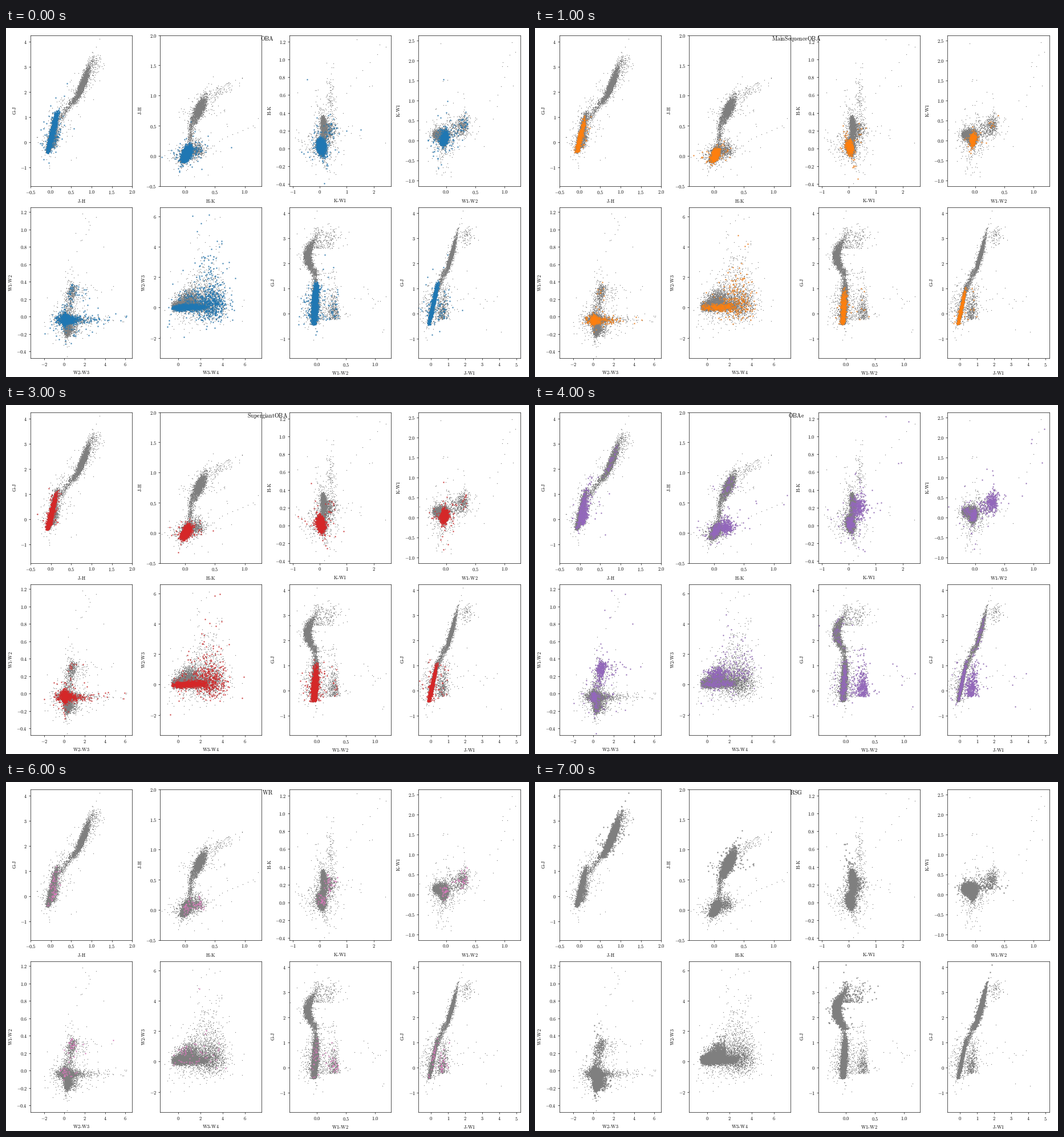
These frames come from a looping animation (917 px wide and 611 px high, 8 s). A matplotlib script:

```python
import math

import numpy as np
import matplotlib.pyplot as plt
from matplotlib.animation import FuncAnimation

W, H, DPI = 917, 611, 64
PX = 72 / DPI  # points per pixel

plt.rcParams.update({
    "mathtext.fontset": "cm",
    "axes.linewidth": 0.67 * PX,
    "axes.labelsize": 8.33 * PX,
})
for side in ("xtick", "ytick"):
    plt.rcParams.update({
        f"{side}.labelsize": 8.33 * PX,
        f"{side}.major.size": 2.9 * PX,
        f"{side}.major.pad": 2.9 * PX,
        f"{side}.major.width": 0.67 * PX,
    })

rng = np.random.default_rng(12)


# --- synthetic stars: one row each, columns as in COLORS

COLORS = ["G-J", "J-H", "H-K", "K-W1", "W1-W2", "W2-W3", "W3-W4"]


def noise(n, sigma):
    """Gaussian scatter with a few strong outliers."""
    return rng.normal(0, np.where(rng.random(n) < 0.04, 4 * sigma, sigma))


def tail(n, share, scale):
    return np.where(rng.random(n) < share, rng.exponential(scale, n), 0)


def hot(n, top=1.35, skew=2.2, faint=0.4):
    """Blue sequence; the faint share forms the cloud at large W3-W4."""
    gj = -0.45 + (top + 0.45) * rng.beta(1.8, skew, n)
    dj, dh = noise(n, 0.025), noise(n, 0.033)
    jh = -0.075 + 0.14 * (gj + 0.4) + dj
    hk = 0.012 + 0.35 * jh + dh
    kw1 = 0.01 + 0.12 * gj - 0.8 * (dj + dh) + noise(n, 0.035)
    w12 = -0.04 + 0.025 * gj + noise(n, 0.025)
    cloud = rng.random(n) < faint
    w34 = np.where(cloud, rng.normal(2.8, 0.75, n),
                   -0.7 + 3.4 * rng.beta(2, 2.3, n))
    w23 = np.where(cloud,
                   rng.normal(0.15, 0.45, n) + tail(n, 0.35, 1.1),
                   0.03 * w34 + noise(n, 0.1))
    return np.column_stack([gj, jh, hk, kw1, w12, w23, w34])


def disk(n):
    """Emission stars, redder than the blue sequence."""
    gj = -0.25 + rng.gamma(1.7, 0.32, n)
    jh = 0.07 + 0.13 * gj + noise(n, 0.045)
    w12 = 0.3 - tail(n, 0.4, 0.09) + noise(n, 0.045)
    hk = 0.09 + 0.4 * w12 + noise(n, 0.06)
    kw1 = 0.2 + 0.6 * w12 + noise(n, 0.12)
    far = rng.random(n) < 0.35
    w34 = np.where(far, rng.normal(2.3, 0.9, n), rng.normal(0.8, 0.45, n))
    w23 = 0.4 + w12 + noise(n, 0.2) + np.where(far, tail(n, 0.6, 0.7), 0)
    return np.column_stack([gj, jh, hk, kw1, w12, w23, w34])


def cool(n):
    """Red supergiant sequence."""
    gj = np.clip(rng.normal(2.28, 0.36, n), 1.55, 3.4) + tail(n, 0.04, 0.35)
    dj, dh = noise(n, 0.04), noise(n, 0.04)
    bow = np.minimum((gj - 2.3) ** 2, 0.6)
    jh = 0.78 + 0.25 * (gj - 2.3) - 0.06 * bow + dj
    hk = 0.24 + 0.4 * (jh - 0.78) + dh
    kw1 = 0.15 + 0.06 * (gj - 2.3) - 0.6 * (dj + dh) + noise(n, 0.03)
    w12 = -0.16 + 0.25 * bow + noise(n, 0.032)
    w12 += np.where(gj > 2.6, tail(n, 0.35, 0.15), 0)
    w34 = -0.7 + 3.8 * rng.beta(2.2, 3.2, n)
    fan = np.clip((w34 + 0.5) / 1.8, 0, 1) * (w34 < 1.6)
    w23 = 0.18 + noise(n, 0.085) + fan * rng.exponential(0.3, n)
    return np.column_stack([gj, jh, hk, kw1, w12, w23, w34])


def yellow(n):
    """Bridge between the blue and the red sequence."""
    gj = rng.uniform(0.85, 1.8, n)
    jh = 0.16 + 0.47 * (gj - 0.85) + noise(n, 0.055)
    hk = 0.05 + 0.1 * jh + noise(n, 0.025)
    kw1 = 0.09 + noise(n, 0.05)
    w12 = -0.03 + noise(n, 0.025)
    w34 = rng.normal(1.5, 0.9, n)
    w23 = 0.1 + noise(n, 0.2) + tail(n, 0.3, 0.6)
    return np.column_stack([gj, jh, hk, kw1, w12, w23, w34])


def carbon(n):
    hk = rng.normal(0.58, 0.13, n)
    gj = 3.1 + noise(n, 0.2)
    jh = 0.76 + 0.55 * hk + noise(n, 0.05)
    kw1 = 0.42 + noise(n, 0.08)
    w12 = 0.18 + noise(n, 0.11)
    w23 = 0.6 + noise(n, 0.2)
    w34 = rng.normal(0.9, 0.6, n)
    return np.column_stack([gj, jh, hk, kw1, w12, w23, w34])


def dusty(n):
    """A few stars strung out along the reddening trail."""
    t = np.linspace(0, 1, n)
    gj = 0.6 + 0.2 * np.sin(9 * t) - 1.4 * t ** 9
    w23 = 1.2 + 1.3 * np.sin(2.4 * t)
    return np.column_stack([gj, 0.28 + 0.22 * t, 0.62 + 0.52 * t,
                            1 + 1.45 * t ** 1.3, 0.75 + 0.38 * t ** 0.6,
                            w23, 1.3 + 0.8 * t])


def stray(n, base=hot, spread=1.0):
    stars = base(n)
    return stars + spread * noise(stars.size, 0.2).reshape(stars.shape) * [
        1.3, 0.4, 0.5, 1.8, 0.5, 4, 3]


groups = [
    ("OBA", [hot(1400, faint=0.42), disk(45), stray(40)]),
    ("MainSequenceOBA", [hot(500, 1.1, 2.6, 0.45), disk(10)]),
    ("EvolvedOBA", [hot(900, 1.2, 2.4, 0.1), disk(18), stray(14)]),
    ("SupergiantOBA", [hot(1200, 1.2, 2.7, 0.32), disk(14), stray(18)]),
    ("OBAe", [hot(220, faint=0.1), disk(330), cool(50), stray(20),
              stray(6, dusty, 1.2)]),
    ("OB[e]", [disk(9), dusty(7)]),
    ("WR", [hot(25), disk(30)]),
    ("RSG", [cool(2300)]),
]
groups = [(name, np.vstack(parts)) for name, parts in groups]
everything = np.vstack([stars for _, stars in groups]
                       + [yellow(360), carbon(90), stray(120)])


# --- panels: x, y, x limits, x step, y limits, y step

PANELS = [
    ("J-H", "G-J", (-0.5, 2.0), 0.5, (-1.75, 4.25), 1),
    ("H-K", "J-H", (-0.42, 1.28), 0.5, (-0.5, 2.0), 0.5),
    ("K-W1", "H-K", (-1.13, 2.64), 1, (-0.42, 1.27), 0.2),
    ("W1-W2", "K-W1", (-0.47, 1.27), 0.5, (-1.14, 2.63), 0.5),
    ("W2-W3", "W1-W2", (-3.34, 6.68), 2, (-0.475, 1.254), 0.2),
    ("W3-W4", "W2-W3", (-1.67, 7.52), 2, (-3.33, 6.61), 2),
    ("W1-W2", "G-J", (-0.47, 1.27), 0.5, (-1.76, 4.23), 1),
    ("J-W1", "G-J", (-0.73, 5.21), 1, (-1.76, 4.23), 1),
]


def values(stars, name):
    if name == "J-W1":
        return stars[:, 1:4].sum(axis=1)
    return stars[:, COLORS.index(name)]


def tex(text):
    return rf"$\text{{{text}}}$"


def ticks(limits, step):
    first, last = math.ceil(limits[0] / step), math.floor(limits[1] / step)
    marks = [k * step for k in range(first, last + 1)]
    digits = 1 if step < 1 else 0
    return marks, [f"${m:.{digits}f}$" for m in marks]


fig = plt.figure(figsize=(W / DPI, H / DPI), dpi=DPI, facecolor="white")


def add_panel(i, x, y, xlim, xstep, ylim, ystep):
    row, col = divmod(i, 4)
    left, top = 43 + 226.8 * col, 12.6 + 301.3 * row
    width, height = 178.2, 264
    ax = fig.add_axes([left / W, 1 - (top + height) / H,
                       width / W, height / H])
    ax.plot(values(everything, x), values(everything, y), "o",
            ms=1.3 * PX, mew=0, color="tab:gray")
    front, = ax.plot([], [], "o", ms=2.7 * PX, mew=0, alpha=0.6)
    ax.set(xlim=xlim, ylim=ylim)
    ax.set_xticks(*ticks(xlim, xstep))
    ax.set_yticks(*ticks(ylim, ystep))
    ax.set_xlabel(tex(x), labelpad=4.6 * PX)
    ax.set_ylabel(tex(y), labelpad=5.4 * PX)
    return front


fronts = [add_panel(i, *panel) for i, panel in enumerate(PANELS)]
title = fig.text(0.5, 1 - 11.6 / H, "", fontsize=10 * PX,
                 ha="center", va="top")


def update(i):
    name, stars = groups[i]
    title.set_text(tex(name))
    for front, (x, y, *_) in zip(fronts, PANELS):
        front.set_data(values(stars, x), values(stars, y))
        front.set_color(f"C{i}")
    return [*fronts, title]


anim = FuncAnimation(fig, update, frames=len(groups), interval=1000,
                     init_func=lambda: update(0), repeat=True)
plt.show()
```
